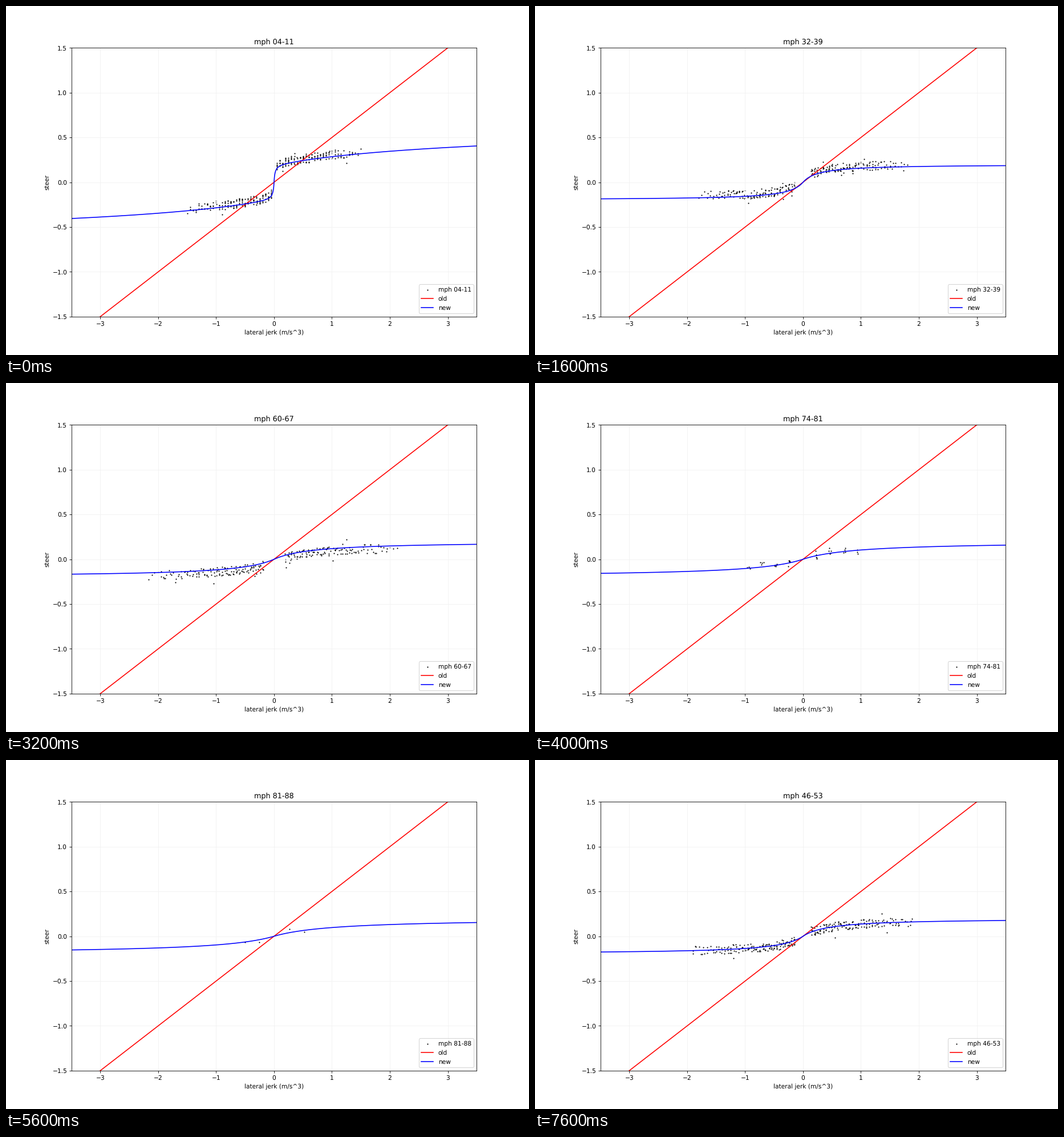
A matplotlib script that plays this animation: 917x611 px, repeating every 8 s.

```python
import numpy as np
import matplotlib.pyplot as plt
from matplotlib.animation import FuncAnimation

W, H, DPI = 917, 611, 76.4
STEP = 7                                      # width of one speed bin, mph
BINS = [4 + STEP * i for i in range(13)]
ORDER = BINS + BINS[:5:-1]                    # up, hold the last bin, back down

# How the sample cloud changes with speed
SPEEDS = [4, 18, 46, 60, 74, 81, 88]
BIAS = [.02, .045, 0, -.025, .01, 0, 0]       # shift from the new curve
REACH = [1.5, 1.7, 1.9, 2.15, 1.1, .8, .3]    # largest jerk
COUNT = [6.5, 5.5, 5.5, 4.5, 6, 1.5, 1.2]     # dots in a column near zero


def new_steer(x, mph):
    """Sigmoid that gets softer with speed, plus a low-speed tail."""
    v = mph + STEP / 2
    soft = 3.94e-4 * v ** 1.9 / (1 + .0085 * v)
    tail = .436 * np.exp((4 - mph) / 4.4)
    return .199 * x / (soft + abs(x)) + tail * x / (3.87 + abs(x))


def samples(mph):
    """Columns of noisy dots around the new curve, thinning outwards."""
    rng = np.random.default_rng(mph)
    bias, reach, count = (np.interp(mph, SPEEDS, row)
                          for row in (BIAS, REACH, COUNT))
    first = max(.05, .0032 * mph)
    gap = .05 if mph < 74 else first
    dots = []
    for side in (-1, 1):
        for x in np.arange(np.ceil(first / gap) * gap, reach + gap / 2, gap):
            n = int(count * (1 - .8 * (x / reach) ** 2) + rng.random())
            noise = rng.uniform(-.05, .05, n)
            noise[rng.random(n) < .04] *= 2.5
            xs = side * x + rng.normal(0, .0002 * mph, n)
            dots += zip(xs, new_steer(xs, mph) + bias + noise)
    return np.array(dots)


CLOUDS = {mph: samples(mph) for mph in BINS}
x = np.linspace(-3.5, 3.5, 1401)

plt.rcParams["text.hinting"] = "none"
# the tiny margin keeps the size from rounding down by a pixel
fig, ax = plt.subplots(figsize=((W + 1e-6) / DPI, (H + 1e-6) / DPI), dpi=DPI)
scatter = ax.scatter([0], [0], s=1, color="black", label="mph")
ax.plot(x, .5 * x, color="red", label="old")
curve, = ax.plot(x, x, color="blue", label="new")
ax.set(xlim=(-3.5, 3.5), ylim=(-1.5, 1.5),
       xlabel="lateral jerk (m/s^3)", ylabel="steer")
ax.grid(color="0.95")
title = ax.set_title("")
speed_label = ax.legend(loc="lower right").get_texts()[0]


def update(i):
    mph = ORDER[i]
    name = f"mph {mph:02d}-{mph + STEP:02d}"
    title.set_text(name)
    speed_label.set_text(name)
    scatter.set_offsets(CLOUDS[mph])
    curve.set_ydata(new_steer(x, mph))
    return scatter, curve, title, speed_label


anim = FuncAnimation(fig, update, frames=len(ORDER), interval=400,
                     repeat=True, repeat_delay=0, blit=False)
plt.show()
```
